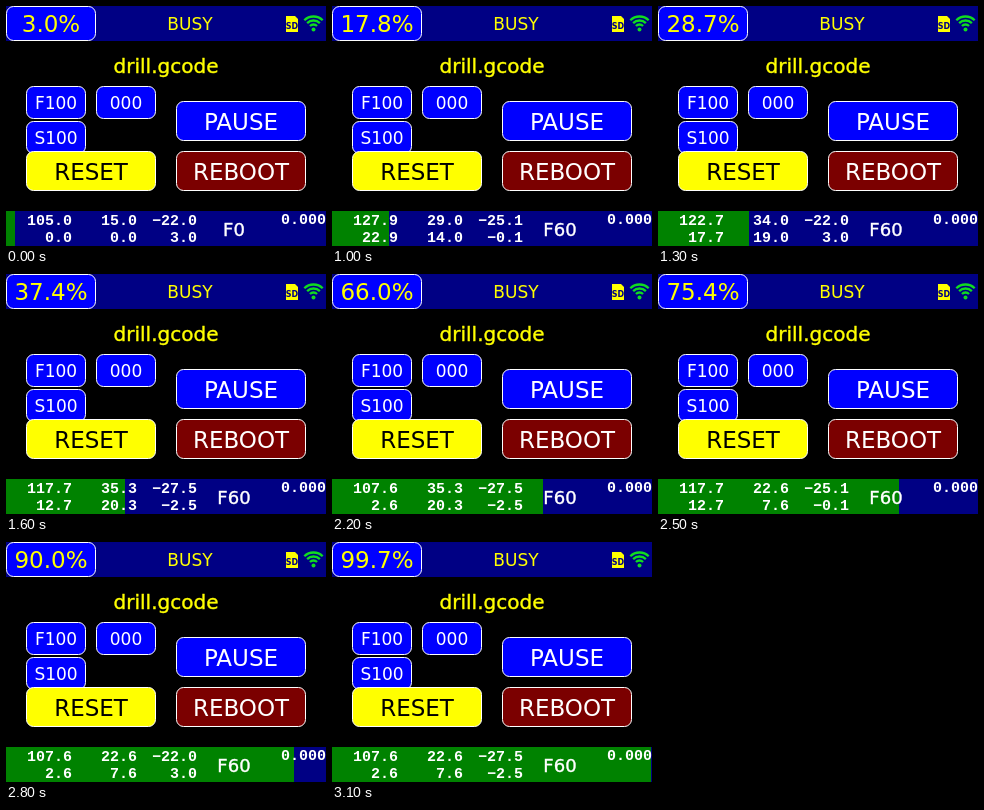
Recreate the animation shown at these times as an HTML page with a canvas. Size 320 by 240 pixels, loop 4.1 s.

```html
<!DOCTYPE html>
<html>
<head>
<meta charset="utf-8">
<style>
html, body { margin: 0; width: 320px; height: 240px; overflow: hidden; background: #000; }
canvas { display: block; }
</style>
</head>
<body>
<canvas id="screen" width="320" height="240"></canvas>
<script>
const ctx = document.getElementById('screen').getContext('2d');
const NAVY = '#000084', BLUE = '#0000ff', MAROON = '#7b0000';
const YELLOW = '#ffff00', WHITE = '#ffffff', GREEN = '#008200';
const SANS = '"DejaVu Sans", sans-serif';
const MONO = 'bold 15px "Liberation Mono", monospace';

// The job waits, then reports at a fixed pace and rests on the last report.
const HOLD = 1000, PACE = 300, LOOP = 4100;
const progress = [3, 17.82, 28.7, 37.4, 46, 66, 75.4, 90, 99.7];

// Drill holes sit on a 3 x 3 grid, given as column and row.
const offset = [105, 15, -25];
const stops = [[2, 1], [1.49, 1.79], [1, 2], [2, 2], [0, 2], [1, 0], [0, 0], [0, 0]];
const heights = { clear: 3, touch: -0.1, deep: -2.5 };
const moves = 'touch clear deep deep deep touch clear deep'.split(' ');

function workPos(i) {
  if (i === 0) return [0, 0, heights.clear];
  const [col, row] = stops[i - 1];
  return [2.57 + 10.16 * col, 7.62 + 6.35 * row, heights[moves[i - 1]]];
}

function text(str, x, y, color, font, align = 'center', weight = 0) {
  ctx.font = typeof font === 'number' ? `${font}px ${SANS}` : font;
  ctx.fillStyle = ctx.strokeStyle = color;
  ctx.textAlign = align;
  ctx.fillText(str, x, y);
  if (weight) {
    ctx.lineWidth = weight;
    ctx.strokeText(str, x, y);
  }
}

function button(label, x, y, w, h, fill, color, size) {
  ctx.beginPath();
  ctx.roundRect(x + 0.5, y + 0.5, w - 1, h - 1, 7);
  ctx.fillStyle = fill;
  ctx.fill();
  ctx.strokeStyle = WHITE;
  ctx.lineWidth = 1;
  ctx.stroke();
  text(label, x + w / 2, Math.round(y + h / 2 + size * 0.39), color, size);
}

function sdIcon() {
  ctx.fillStyle = YELLOW;
  ctx.beginPath();
  ctx.moveTo(280, 10);
  ctx.lineTo(289, 10);
  ctx.lineTo(292, 13);
  ctx.lineTo(292, 26);
  ctx.lineTo(280, 26);
  ctx.fill();
  text('SD', 286, 23, NAVY, `bold 8px ${SANS}`);
}

function wifiIcon() {
  ctx.strokeStyle = ctx.fillStyle = '#10dc20';
  ctx.lineWidth = 2.3;
  for (const r of [5, 9, 13]) {
    ctx.beginPath();
    ctx.arc(307.5, 23.5, r, -Math.PI * 0.75, -Math.PI * 0.25);
    ctx.stroke();
  }
  ctx.beginPath();
  ctx.arc(307.5, 23.5, 2, 0, Math.PI * 2);
  ctx.fill();
}

const fixed = v => v.toFixed(1).replace('-', '\u2212');

function footer(percent, feed, pos) {
  ctx.fillStyle = NAVY;
  ctx.fillRect(0, 205, 320, 35);
  ctx.fillStyle = GREEN;
  ctx.fillRect(0, 205, Math.floor(percent * 3.2), 35);
  [66, 131, 191].forEach((x, i) => {
    text(fixed(pos[i] + offset[i]), x, 219, WHITE, MONO, 'right');
    text(fixed(pos[i]), x, 236, WHITE, MONO, 'right');
  });
  text('F' + feed, 228, 230, WHITE, 18, 'center', 0.4);
  text('0.000', 320, 218, WHITE, MONO, 'right');
}

function draw(t) {
  const i = t < HOLD ? 0 : Math.min(progress.length - 1, 1 + Math.floor((t - HOLD) / PACE));
  const percent = progress[i];
  ctx.fillStyle = '#000';
  ctx.fillRect(0, 0, 320, 240);
  ctx.fillStyle = NAVY;
  ctx.fillRect(0, 0, 320, 35);
  button(percent.toFixed(1) + '%', 0, 0, 90, 35, BLUE, YELLOW, 23);
  text('BUSY', 184, 24, YELLOW, 17);
  sdIcon();
  wifiIcon();
  text('drill.gcode', 160, 67, YELLOW, 20, 'center', 0.4);
  button('F100', 20, 80, 60, 33, BLUE, WHITE, 17);
  button('000', 90, 80, 60, 33, BLUE, WHITE, 17);
  button('S100', 20, 115, 60, 33, BLUE, WHITE, 17);
  button('PAUSE', 170, 95, 130, 40, BLUE, WHITE, 23);
  button('RESET', 20, 145, 130, 40, YELLOW, '#000', 23);
  button('REBOOT', 170, 145, 130, 40, MAROON, WHITE, 23);
  footer(percent, i ? 60 : 0, workPos(i));
}

function tick() {
  draw(performance.now() % LOOP);
  requestAnimationFrame(tick);
}
tick();
</script>
</body>
</html>
```
